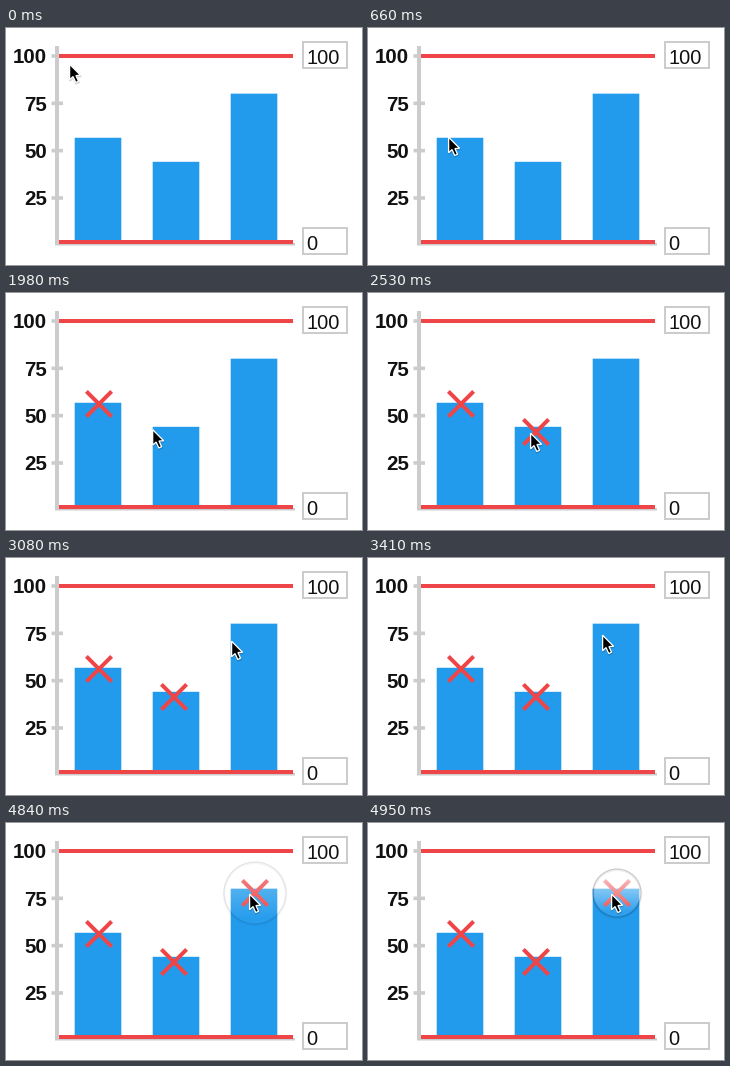
These frames come from a looping animation (356 by 237 pixels, 5170 ms). A matplotlib script:

```python
import numpy as np
import matplotlib.pyplot as plt
from matplotlib.animation import FuncAnimation
from matplotlib.patches import Circle, Polygon, Rectangle

W, H, DPI = 356, 237, 100
FRAMES, STEP = 47, 110
PX = 72 / DPI
RED, BLUE, GREY = "#ee4648", "#229bec", "#cccccc"

START = np.array([64, 36])
# per bar: value, frame the cursor leaves, frame the cross lands, hover, click
VISITS = [(56.7, 2, 13, (81, 109), (88, 112)),
          (44, 15, 23, (158, 141), (163, 140)),
          (80, 24, 34, (226, 83), (244, 71))]
MOVE = 4
CLICK_TO_CROSS = np.array([5, -1])
LENS_START = FRAMES - 3
ARROW = 1.04 * np.array([(0, 0), (0, 15), (3.3, 11.9), (5.9, 17.6),
                         (8.6, 16.4), (6.1, 10.9), (10.6, 10.7)])
ARROW += (-0.4, 0.2)

fig = plt.figure(figsize=(W / DPI, H / DPI), dpi=DPI, facecolor="white")
ax = fig.add_axes([0, 0, 1, 1])
ax.axis("off")


def y_of(value):
    return 28 + 1.893 * (100 - value)


def ease(t):
    t = min(max(t, 0), 1)
    return t * t * (3 - 2 * t)


def box(x0, y0, x1, y1, color):
    ax.add_patch(Rectangle((x0, y0), x1 - x0, y1 - y0, fc=color, lw=0,
                           snap=False))


def label(x, y, text, size, **style):
    ax.text(x, y, text, family="Liberation Sans", size=size * PX,
            va="baseline", color="#111111", **style)


def cross(x, y, arm=12.6):
    return [ax.plot([x - arm, x + arm], [y - s * arm, y + s * arm],
                    color=RED, lw=4 * PX, solid_capstyle="butt",
                    zorder=3)[0] for s in (1, -1)]


def glass_disc(size=96):
    """White disc that clears towards the bottom."""
    y, x = np.mgrid[-1:1:size * 1j, -1:1:size * 1j]
    image = np.ones((size, size, 4))
    fade = np.clip(0.38 - 0.4 * y, 0.06, 0.6)
    image[..., 3] = fade * (np.hypot(x, y) < 1)
    return image


def cursor_at(i):
    pos = START
    for _, leave, land, hover, click in VISITS:
        hover, click = np.array(hover), np.array(click)
        if i > leave:
            pos = (pos + (hover - pos) * ease((i - leave) / MOVE)
                   + (click - hover) * ease((i - land + 1 + MOVE) / MOVE))
    return pos


# axes
box(49, 18, 53, 217, GREY)
box(49, 215, 289, 217.5, GREY)
for value in (25, 50, 75, 100):
    y = y_of(value)
    box(45.5, y - 1.8, 57, y + 1.8, GREY)
    label(41.2, y + 7.2, str(value), 20.5, weight="bold", ha="right")

# bars, with slightly soft edges
for k, (value, *_) in enumerate(VISITS):
    left = 69 + 78 * k
    box(left - 0.3, y_of(value) - 0.2, left + 46.3, 213, BLUE)

# limit lines and their value fields
for y, text in [(28, "100"), (214, "0")]:
    box(53, y - 2, 287, y + 2, RED)
    ax.add_patch(Rectangle((297, y - 14), 44, 26, fc="white", ec=GREY,
                           lw=2 * PX, joinstyle="miter"))
    label(300.5, y + 8, text, 20)

crosses = [(land, cross(*(click + CLICK_TO_CROSS)))
           for _, _, land, _, click in VISITS]

lens_x, lens_y = VISITS[-1][-1] + CLICK_TO_CROSS
glass = ax.imshow(glass_disc(), zorder=4, aspect="auto",
                  interpolation="bilinear")
rims = [ax.add_patch(Circle((lens_x, lens_y + drop), fc="none", ec="black",
                            lw=width * PX, zorder=5))
        for drop, width in [(0, 1), (0.8, 2.5)]]
shadow = ax.add_patch(Polygon(ARROW, fc="black", alpha=0.15, lw=2 * PX,
                              ec="black", zorder=6))
arrow = ax.add_patch(Polygon(ARROW, fc="black", ec="white", lw=1.3 * PX,
                             joinstyle="miter", zorder=7))


def draw(i):
    tip = cursor_at(i)
    arrow.set_xy(ARROW + tip)
    shadow.set_xy(ARROW + tip + (0.3, 1))
    for land, lines in crosses:
        for line in lines:
            line.set_visible(i >= land)

    # the lens shrinks into place as it fades in
    shown = ease((i - LENS_START + 1) / 2)
    radius = 38 - 14 * shown
    glass.set_extent((lens_x - radius, lens_x + radius,
                      lens_y + radius, lens_y - radius))
    for rim in rims:
        rim.set_radius(radius)
    for part, alpha in zip([glass, *rims], (1, 0.17, 0.07)):
        part.set_alpha(alpha * shown)
    ax.set(xlim=(0, W), ylim=(H, 0))
    return [arrow, shadow, glass, *rims]


anim = FuncAnimation(fig, draw, frames=FRAMES, interval=STEP, repeat=True,
                     repeat_delay=0, blit=False)
plt.show()
```
